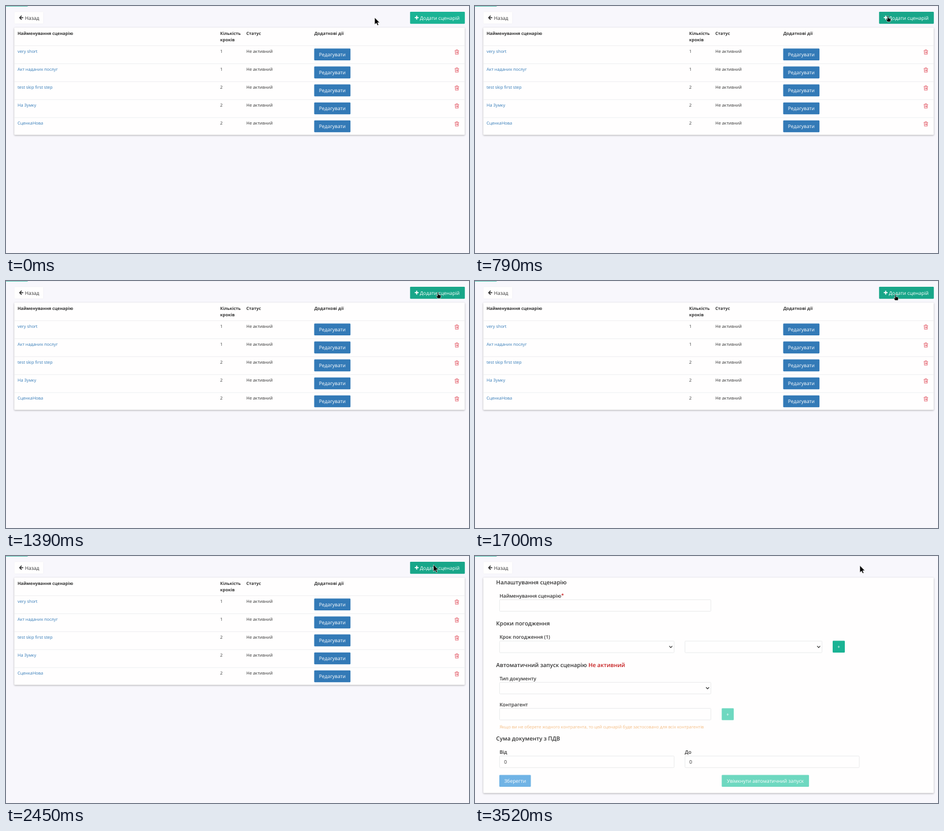
Animation, 800 px wide and 427 px high, one loop 4.33 s. Source, as an HTML page:

```html
<!DOCTYPE html>
<html lang="uk">
<head>
<meta charset="utf-8">
<title>Сценарії</title>
<style>
  html, body { margin: 0; width: 100%; height: 100%; overflow: hidden; background: #f8f7fc; }
  svg { display: block; width: 100%; height: 100%; font: 7.35px "Open Sans", sans-serif; fill: #333; text-rendering: geometricPrecision; }
  .card { fill: #fffefe; filter: drop-shadow(0 1px 1.6px rgba(0, 0, 0, .3)); }
  .bold { font-weight: 700; }
  .link { fill: #337ab7; }
  .btn { font-size: 8.47px; }
  .on { font-size: 8.47px; fill: #fff; text-anchor: middle; }
  .head { font-size: 9.72px; font-weight: 600; }
  .label { font-size: 8.47px; font-weight: 600; }
  .red { fill: #c51a1b; }
  .hint { fill: #f4bd83; }
  .field { fill: #fffefe; stroke: #e5e6e7; stroke-width: .8; }
  .line { stroke: #e9eaed; stroke-width: .8; }
  .icon { fill: none; stroke: #333; stroke-width: 1.6; }
  .trash { fill: none; stroke: #e4606c; stroke-width: .8; }
</style>
</head>
<body>
<svg id="stage" viewBox="0 0 800 427" preserveAspectRatio="none"></svg>
<script>
const LOOP = 4330, PAGE_AT = 2580;
const GREEN = '#1ab394', HOVER = '#18a689';

const text = (x, y, s, cls = '') => `<text x="${x}" y="${y}" class="${cls}">${s}</text>`;
const box = (x, y, w, h, fill, extra = '') => `<rect x="${x}" y="${y}" width="${w}" height="${h}" rx="1.3" fill="${fill}" ${extra}/>`;
const field = (x, y, w) => box(x + .4, y + .4, w - .8, 20, '', 'class="field"');
const path = (d, cls) => `<path d="${d}" class="${cls}"/>`;
const button = (x, y, w, fill, s) => box(x, y, w, 20.6, fill) + text(x + w / 2, y + 13.4, s, 'on');
const select = (x, y, w) => field(x, y, w) +
  `<path d="M${x + w - 8.8} ${y + 9}l2.6 2.6 2.6-2.6" class="icon" style="stroke-width:1.2"/>`;

const rows = [
  ['very short', 1],
  ['Акт наданих послуг', 1],
  ['test skip first step', 2],
  ['На Зумку', 2],
  ['СценкаНова', 2]
];

function row([name, steps], i) {
  const y = 69 + i * 31.05;
  return path(`M14.5 ${y - .3}H792.5`, 'line') +
    text(20, y + 12.2, name, 'link') +
    text(370, y + 12.2, steps) +
    text(415.3, y + 12.2, 'Не активний') +
    button(532.5, y + 4.5, 62.7, '#337ab7', 'Редагувати') +
    path(`M775.2 ${y + 8.2}h7.6m-5.2 0v-1.5h2.8v1.5m-4.2 0 .3 6.3h5l.3-6.3m-3.8 1.7v3m1.3-3v3m1.3-3v3`, 'trash');
}

const list = box(14.3, 37.3, 778.4, 185.4, '', 'class="card"') +
  text(20, 50.3, 'Найменування сценарію', 'bold') +
  text(370, 50.3, 'Кількість', 'bold') +
  text(370, 61, 'кроків', 'bold') +
  text(415.3, 50.3, 'Статус', 'bold') +
  text(532.7, 50.3, 'Додаткові дії', 'bold') +
  rows.map(row).join('') +
  box(698.2, 10, 94.6, 20.8, GREEN, 'id="add"') +
  path('M706.3 20.1h6.6m-3.3-3.3v6.6', 'icon" style="stroke:#fff;stroke-width:1.8') +
  text(715, 23.5, 'Додати сценарій', 'btn" style="fill:#fff');

const form = box(14.3, 37.3, 778.4, 372.5, '', 'class="card"') +
  text(36.6, 48.9, 'Налаштування сценарію', 'head') +
  text(42.4, 72, 'Найменування сценарію<tspan class="red" dy="-1.5">*</tspan>', 'label') +
  field(42, 75.2, 366) +
  text(36.6, 120.4, 'Кроки погодження', 'head') +
  text(42.4, 143.4, 'Крок погодження (1)', 'label') +
  select(42, 146.7, 302.5) + select(362.4, 146.7, 237.6) +
  button(618, 146.5, 21, GREEN, '+') +
  text(36.6, 191.9, 'Автоматичний запуск сценарію <tspan class="red">Не активний</tspan>', 'head') +
  text(42.4, 215, 'Тип документу', 'label') +
  select(42, 218, 366) +
  text(42.4, 260.4, 'Контрагент', 'label') +
  field(42, 263, 366) +
  button(426.3, 263.2, 20.8, '#6ed8c0', '+') +
  text(42.4, 298, 'Якщо ви не оберете жодного контрагента, то цей сценарій буде застосовано для всіх контрагентів', 'hint') +
  text(36.6, 319, 'Сума документу з ПДВ', 'head') +
  text(42.4, 342.2, 'Від', 'label') + text(362.6, 342.2, 'До', 'label') +
  field(42, 345.4, 302.5) + field(362.4, 345.4, 302) +
  text(50.3, 359, '0', 'btn') + text(370.3, 359, '0', 'btn') +
  button(42, 378.4, 54.5, '#70b3e5', 'Зберегти') +
  button(426.3, 378.4, 150.8, '#6ed8c0', 'Увімкнути автоматичний запуск');

const stage = document.getElementById('stage');
stage.innerHTML = box(0, 0, 800, 427, '#f8f7fc') +
  '<path d="M0 .4H800" stroke="#eeedf2" stroke-width=".8"/><path d="M0 .4H37.5" stroke="#48c3ad" stroke-width="1"/>' +
  box(14.3, 10, 50.4, 20.8, '#fffefe', 'stroke="#efeff3" stroke-width=".5"') +
  path('M29.8 20.2H23.8m3.2-3.4-3.4 3.4 3.4 3.4', 'icon') +
  text(32.8, 23.5, 'Назад', 'btn') +
  `<g id="list">${list}</g><g id="form">${form}</g>` +
  `<g id="cursor" fill="#000" stroke="#fff" stroke-width=".6">
    <path id="arrow" d="M0 0V12L2.9 9.6 4.8 13.6 6.8 12.7 5 8.8H8.6Z"/>
    <path id="hand" d="M-.9 .8Q0-.5 .9 .8V4.2L4 4.9Q5.2 5.3 5 6.5L4.3 10.6H-.8L-3.2 6.7Q-3.3 5.5-2 5.9L-.9 7Z"/>
  </g>`;

// Pointer path: time, x, y
const track = [
  [0, 637, 20], [450, 638, 20], [580, 642, 19.5], [760, 700, 17], [960, 787, 15],
  [1040, 789, 11], [1090, 784, 7], [1120, 780, 1.5], [1220, 775, 8], [1400, 745, 20],
  [1600, 727, 23], [1730, 726.5, 23], [1950, 735, 17], [2180, 738.5, 15],
  [3030, 738.5, 15], [3150, 712, 16], [3270, 682, 17], [3380, 671, 17], [3520, 665, 16.5], [LOOP, 665, 16.5]
];

function pointer(t) {
  const i = track.findIndex(p => p[0] > t);
  const [t0, x0, y0] = track[i - 1], [t1, x1, y1] = track[i];
  const k = (t - t0) / (t1 - t0);
  return [x0 + (x1 - x0) * k, y0 + (y1 - y0) * k];
}

const el = id => document.getElementById(id);
const show = (id, on) => el(id).setAttribute('display', on ? 'inline' : 'none');
const within = (t, a, b) => t >= a && t < b;

function draw(now) {
  const t = Math.max(0, now) % LOOP;
  const [x, y] = pointer(t);
  const hand = within(t, 790, 1060) || within(t, 1250, 2200);
  el('cursor').setAttribute('transform', `translate(${x} ${y})`);
  show('hand', hand);
  show('arrow', !hand);
  show('list', t < PAGE_AT);
  show('form', t >= PAGE_AT);
  el('add').setAttribute('fill', within(t, 790, PAGE_AT) ? HOVER : GREEN);
}

const start = performance.now();
function tick() {
  draw(performance.now() - start);
  requestAnimationFrame(tick);
}
tick();
</script>
</body>
</html>
```
